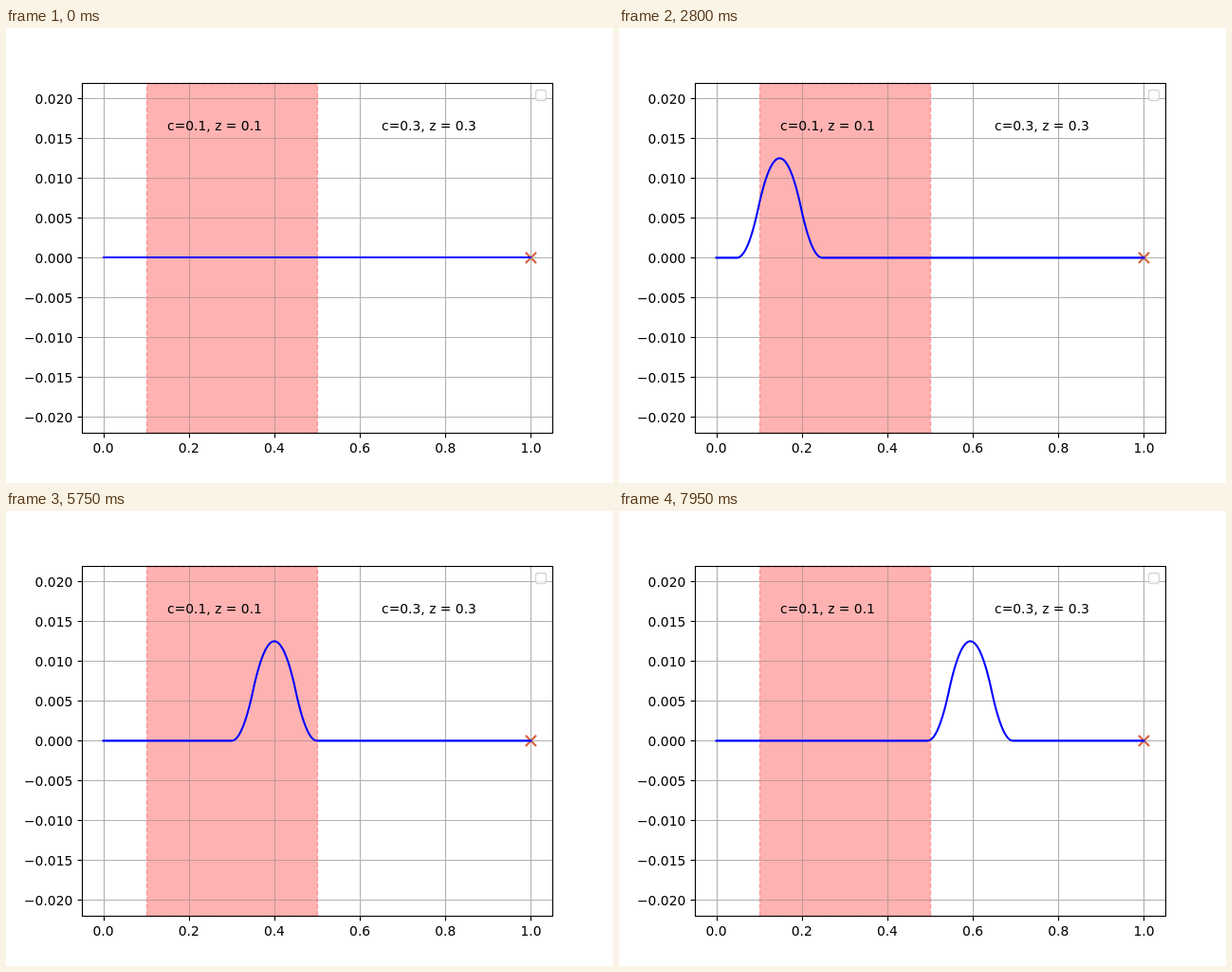
Recreate the animation shown at these times as an HTML page with a canvas. Size 640 by 480 pixels, loop 8000 ms.

```html
<!DOCTYPE html>
<html lang="en">
<head>
<meta charset="utf-8">
<title>Travelling pulse</title>
<style>
  html, body { margin: 0; width: 100%; height: 100%; overflow: hidden; background: #fff; }
  canvas { display: block; width: 640px; height: 480px; }
</style>
</head>
<body>
<canvas id="stage" width="640" height="480"></canvas>
<script>
const ctx = document.getElementById('stage').getContext('2d');
const LOOP = 8000, STEP = 50, START = 950;
const PT = 100 / 72;
const LEFT = 80, RIGHT = 576, TOP = 57.6, BOTTOM = 427.2;

const px = x => LEFT + (x + 0.05) / 1.1 * (RIGHT - LEFT);
const py = y => (TOP + BOTTOM) / 2 - y / 0.044 * (BOTTOM - TOP);
const snap = v => Math.floor(v + 0.5) + 0.5;

const xTicks = [0, 1, 2, 3, 4, 5].map(i => i * 0.2);
const yTicks = [-4, -3, -2, -1, 0, 1, 2, 3, 4].map(i => i * 0.005);

function segment(x1, y1, x2, y2) {
  ctx.beginPath();
  ctx.moveTo(x1, y1);
  ctx.lineTo(x2, y2);
  ctx.stroke();
}

function pen(color, points) {
  ctx.strokeStyle = color;
  ctx.lineWidth = points * PT;
}

// Smooth bump made of parabolas, half-width 0.1
function bump(d) {
  const r = Math.abs(d) / 0.1;
  if (r >= 1) return 0;
  return 0.0125 * (r < 0.5 ? 1 - 2 * r * r : 2 * (1 - r) * (1 - r));
}

// Pulse centre after n steps
function centre(n) {
  if (n <= 84) return 0.0025 + 0.00394 * n;
  if (n <= 96) return 0.3335 + (n - 84) / 12 * 0.0665;
  return 0.4 + (n - 96) * 0.00441;
}

function drawSpan() {
  const x1 = snap(px(0.1)), x2 = snap(px(0.5));
  const y1 = snap(TOP), y2 = snap(BOTTOM);
  ctx.fillStyle = 'rgba(255,0,0,0.3)';
  ctx.fillRect(x1, y1, x2 - x1, y2 - y1);
  pen('rgba(255,0,0,0.3)', 1);
  ctx.setLineDash([3.7 * PT, 1.6 * PT]);
  ctx.beginPath();
  ctx.moveTo(x1, y2);
  ctx.lineTo(x1, y1);
  ctx.lineTo(x2, y1);
  ctx.lineTo(x2, y2);
  ctx.closePath();
  ctx.stroke();
  ctx.setLineDash([]);
}

function drawCross() {
  const x = px(1), y = py(0), r = 5.6;
  pen('#d95f3b', 1.5);
  segment(x - r, y - r, x + r, y + r);
  segment(x - r, y + r, x + r, y - r);
}

function drawGrid() {
  const x1 = snap(px(0.1)), x2 = snap(px(0.5));
  pen('#b0b0b0', 0.8);
  for (const v of xTicks) {
    const x = snap(px(v));
    ctx.strokeStyle = x > x1 && x < x2 ? '#c49898' : '#b0b0b0';
    segment(x, TOP, x, BOTTOM);
  }
  for (const v of yTicks) {
    const y = snap(py(v));
    ctx.strokeStyle = '#b0b0b0';
    segment(LEFT, y, x1, y);
    segment(x2, y, RIGHT, y);
    ctx.strokeStyle = '#c49898';
    segment(x1, y, x2, y);
  }
}

function drawAxes() {
  pen('#000', 0.8);
  ctx.fillStyle = '#000';
  ctx.font = 10 * PT + 'px "DejaVu Sans", sans-serif';
  ctx.textAlign = 'center';
  for (const v of xTicks) {
    const x = snap(px(v));
    segment(x, 427.5, x, 432.4);
    ctx.fillText(v.toFixed(1), px(v), 448);
  }
  ctx.textAlign = 'right';
  for (const v of yTicks) {
    const y = snap(py(v));
    segment(75.6, y, 80.5, y);
    ctx.fillText(v.toFixed(3).replace('-', '\u2212'), 70.3, Math.round(py(v) + 5.3));
  }
}

function drawFrame() {
  pen('#000', 0.8);
  ctx.strokeRect(80.5, 58.5, 496, 369);
  ctx.textAlign = 'left';
  ctx.fillText('c=0.1, z = 0.1', 170, 108);
  ctx.fillText('c=0.3, z = 0.3', 396, 108);
  ctx.beginPath();
  ctx.roundRect(558.5, 65.5, 11, 11, 2.8);
  ctx.fillStyle = 'rgba(255,255,255,0.8)';
  ctx.fill();
  pen('rgba(204,204,204,0.8)', 1);
  ctx.stroke();
}

function drawWave(t) {
  pen('#00f', 1.5);
  ctx.lineCap = 'square';
  ctx.lineJoin = 'round';
  if (t < START) {
    segment(103, 242, 553, 242);
  } else {
    const s = centre(Math.floor((t - START) / STEP));
    ctx.beginPath();
    for (let i = 0; i <= 500; i++) {
      const x = i / 500;
      // The second term is the echo from the fixed left end
      ctx.lineTo(px(x), py(bump(x - s) - bump(x + s + 0.002)));
    }
    ctx.stroke();
  }
  ctx.lineCap = 'butt';
  ctx.lineJoin = 'miter';
}

function draw(t) {
  ctx.fillStyle = '#fff';
  ctx.fillRect(0, 0, 640, 480);
  drawSpan();
  drawCross();
  drawGrid();
  drawAxes();
  drawWave(t);
  ctx.fillStyle = '#000';
  drawFrame();
}

const begin = performance.now();
function tick() {
  draw((performance.now() - begin) % LOOP);
  requestAnimationFrame(tick);
}
tick();
</script>
</body>
</html>
```
